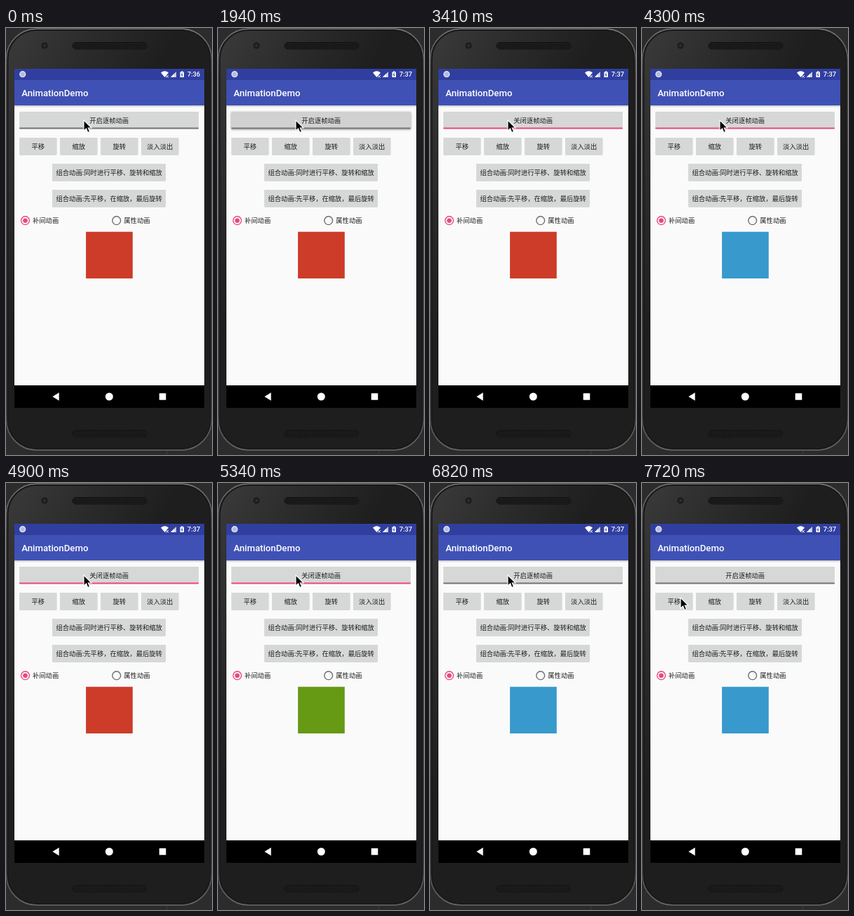
Write an HTML page that moves like this. It is 294x607 px and loops after 8000 ms.

```html
<!DOCTYPE html>
<html lang="zh-CN">
<head>
<meta charset="utf-8">
<title>AnimationDemo</title>
<style>
  html, body { margin: 0; width: 100%; height: 100%; overflow: hidden; background: #2c2c2c; }
  svg { display: block; width: 100vw; height: 100vh; }
  text { font: 9.3px "Noto Sans CJK SC", "Noto Sans CJK", sans-serif; fill: #1d1d1d; }
  .mid { text-anchor: middle; }
  .title { font: 500 13.2px Roboto, sans-serif; fill: #fff; }
  .clock { font: 500 9.4px Roboto, sans-serif; fill: #fff; }
  .button { fill: #d6d7d7; filter: drop-shadow(0 .6px .7px rgba(0, 0, 0, .25)); }
  .anim { animation: 8s step-end infinite; }

  #before { animation-name: before; }
  #after { animation-name: after; }
  #toggle { animation-name: press; }
  #bar { animation-name: bar; }
  #open { animation-name: open; }
  #close { animation-name: close; }
  #square { animation-name: colors; }
  #pointer { animation-name: move; }

  @keyframes before { 0% { opacity: 1 } 16.75%, 100% { opacity: 0 } }
  @keyframes after { 0% { opacity: 0 } 16.75%, 100% { opacity: 1 } }
  @keyframes press {
    0%, 27.875%, 79.75%, 100% { fill: #d6d7d7; filter: drop-shadow(0 .6px .7px rgba(0, 0, 0, .25)) }
    24.25%, 77.875% { fill: #d1d1d1; filter: drop-shadow(0 1.5px 1.6px rgba(0, 0, 0, .42)) }
  }
  @keyframes bar { 0%, 79.75%, 100% { fill: #777 } 26% { fill: #ee4a83 } }
  @keyframes open { 0%, 79.75%, 100% { opacity: 1 } 26% { opacity: 0 } }
  @keyframes close { 0%, 79.75%, 100% { opacity: 0 } 26% { opacity: 1 } }
  @keyframes colors {
    0%, 42.625%, 61.25% { fill: #cd3c29 }
    31.5%, 48.25%, 66.75% { fill: #669914 }
    37.125%, 53.75%, 74.25%, 100% { fill: #3899cd }
  }
  @keyframes move {
    0% { transform: translate(111px, 131px) }
    92.75% { transform: translate(80.5px, 157px) }
    94.625% { transform: translate(63px, 164.5px) }
    96.5%, 100% { transform: translate(55px, 163px) }
  }
</style>
</head>
<body>
<svg viewBox="0 0 294 607" preserveAspectRatio="none">
  <defs>
    <linearGradient id="rim" x2="0" y2="1">
      <stop stop-color="#777"/>
      <stop offset=".12" stop-color="#4a4a4a"/>
      <stop offset=".9" stop-color="#444"/>
      <stop offset="1" stop-color="#686868"/>
    </linearGradient>
    <linearGradient id="body" gradientUnits="userSpaceOnUse" x1="10" y1="10" x2="190" y2="110">
      <stop stop-color="#393939"/>
      <stop offset=".5" stop-color="#2b2b2b"/>
      <stop offset="1" stop-color="#1e1e1e"/>
    </linearGradient>
    <linearGradient id="shade" x2="0" y2="1">
      <stop stop-color="#000" stop-opacity=".22"/>
      <stop offset="1" stop-color="#000" stop-opacity="0"/>
    </linearGradient>
    <pattern id="mesh" width="3" height="3" patternUnits="userSpaceOnUse">
      <rect width="3" height="3" fill="#161616"/>
      <circle cx="1.5" cy="1.5" r=".8" fill="#262626"/>
    </pattern>
  </defs>

  <!-- phone -->
  <rect width="294" height="607" fill="#2c2c2c"/>
  <path d="M229.5 600v7" stroke="#3d3d3d"/>
  <rect x=".5" y="1.2" width="293" height="598.8" rx="43" fill="#191919" stroke="url(#rim)" stroke-width="1.6"/>
  <rect x="3.5" y="4" width="287" height="593" rx="40" fill="url(#body)"/>
  <g fill="url(#mesh)" stroke="#141414">
    <rect x="95" y="20.5" width="106" height="9.5" rx="4.7"/>
    <rect x="95" y="572" width="106" height="9.5" rx="4.7"/>
  </g>
  <circle cx="55" cy="25" r="5" fill="#1c1c1c" stroke="#303030"/>
  <circle cx="55" cy="25" r="2" fill="#2c3036"/>

  <!-- screen -->
  <rect x="12" y="58" width="271" height="482" fill="#fafafa"/>
  <rect x="12" y="110" width="271" height="3" fill="url(#shade)"/>
  <rect x="12" y="58" width="271" height="16" fill="#303f9f"/>
  <rect x="12" y="74" width="271" height="36" fill="#3f51b5"/>
  <rect x="12" y="508" width="271" height="32"/>

  <!-- status and navigation -->
  <circle cx="23.7" cy="65.7" r="3.8" fill="#b4bbe0" stroke="#d8dbea" stroke-width="1.7"/>
  <g fill="#fff">
    <path d="M221 63.5q5.5-4.5 11 0L226.5 70z"/>
    <path d="M243 62v8h-8z" opacity=".75"/>
    <path d="M240 65v5h-5z"/>
    <path d="M248.5 62.5h1.5v-1h2.5v1h1.5V70h-5.5z"/>
    <path d="M75.7 518.2v11.6L66.4 524z"/>
    <circle cx="147.3" cy="524" r="5.5"/>
    <rect x="218.7" y="519.2" width="9.6" height="9.6" rx=".6"/>
  </g>
  <path d="m228 67 4 3.5m0-3.5-4 3.5" stroke="#fff" stroke-width=".9"/>
  <path d="m252 63.5-2 3h2l-1 2.5" fill="none" stroke="#303f9f" stroke-width=".9"/>
  <text class="clock anim" id="before" x="258.7" y="69.4">7:36</text>
  <text class="clock anim" id="after" x="258.7" y="69.4">7:37</text>
  <text class="title" x="22.3" y="97">AnimationDemo</text>

  <!-- buttons -->
  <rect id="toggle" class="button anim" x="19" y="119" width="256" height="24.3" rx="1.3"/>
  <rect id="bar" class="anim" x="19" y="141.6" width="256" height="1.8" rx=".7"/>
  <g class="button">
    <rect x="19" y="156" width="53.3" height="24.5" rx="1.3"/>
    <rect x="77" y="156" width="53.3" height="24.5" rx="1.3"/>
    <rect x="135" y="156" width="53.3" height="24.5" rx="1.3"/>
    <rect x="193" y="156" width="53.3" height="24.5" rx="1.3"/>
    <rect x="66" y="193" width="162" height="24.5" rx="1.3"/>
    <rect x="66" y="230" width="162" height="24.5" rx="1.3"/>
  </g>
  <g class="mid">
    <text id="open" class="anim" x="147.2" y="135">开启逐帧动画</text>
    <text id="close" class="anim" x="147.2" y="135">关闭逐帧动画</text>
    <text x="45.7" y="172">平移</text>
    <text x="103.7" y="172">缩放</text>
    <text x="161.7" y="172">旋转</text>
    <text x="219.7" y="172">淡入淡出</text>
    <text x="147.2" y="209">组合动画:同时进行平移、旋转和缩放</text>
    <text x="147.2" y="246">组合动画:先平移，在缩放，最后旋转</text>
  </g>

  <!-- radio group -->
  <circle cx="27.5" cy="273.7" r="5.9" fill="none" stroke="#ec4681" stroke-width="1.4"/>
  <circle cx="27.5" cy="273.7" r="3.3" fill="#ec4681"/>
  <circle cx="157.7" cy="273.7" r="5.9" fill="none" stroke="#6d6d6d" stroke-width="1.4"/>
  <text x="38" y="277.3">补间动画</text>
  <text x="168.3" y="277.3">属性动画</text>

  <rect id="square" class="anim" x="114.1" y="289.7" width="66.7" height="66.3"/>

  <path id="pointer" class="anim" d="M0 0v15.2l3.5-3.2 2.3 5.4 2.7-1.1-2.3-5.3h4.8z" fill="#000" stroke="#fff" stroke-width="1.1"/>
</svg>
</body>
</html>
```
